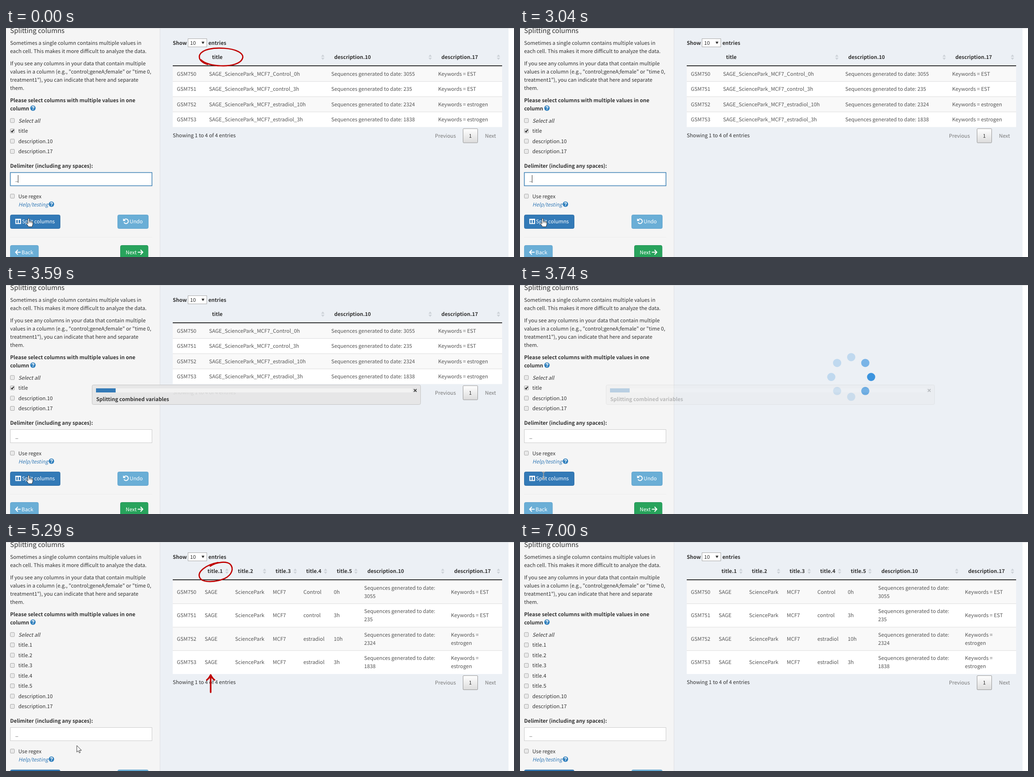
Recreate the animation shown at these times as an HTML page. Size 1112 by 503 pixels, loop 7070 ms.

```html
<!DOCTYPE html>
<html lang="en">
<head>
<meta charset="utf-8">
<title>Splitting columns</title>
<style>
html, body { margin: 0; width: 100%; height: 100%; overflow: hidden; background: #fff; }
svg { display: block; width: 1112px; height: 503px; }
text {
  font: 11.3px "Noto Sans CJK JP", "Noto Sans CJK SC", "Noto Sans CJK", sans-serif;
  fill: #333; white-space: pre; text-rendering: geometricPrecision;
}
.b { font-weight: 700; }
.i { font-style: italic; }
.cell { fill: #555; }
.page { fill: #777; }
.white { fill: #fff; }
.link { fill: #337ab7; font-style: italic; }
.h { font-size: 14.6px; }
.ink { fill: none; stroke: #c00000; stroke-width: 2.7; stroke-linecap: round; stroke-linejoin: round; }
.icon { fill: none; stroke: #fff; stroke-width: 2; }
</style>
</head>
<body>
<svg id="stage" viewBox="0 0 1112 503" xmlns="http://www.w3.org/2000/svg"></svg>
<script>
const LOOP = 7070;
const stage = document.getElementById('stage');

// Drawing helpers
const text = (x, y, s, cls = '') => `<text x="${x}" y="${y}" class="${cls}">${s}</text>`;
const rect = (x, y, w, h, fill, more = '') =>
  `<rect x="${x}" y="${y}" width="${w}" height="${h}" fill="${fill}" ${more}/>`;
const path = (d, more) => `<path d="${d}" ${more}/>`;
const group = (id, body, more = '') => `<g id="${id}" ${more}>${body}</g>`;

const button = (x, y, w, fill, edge) =>
  rect(x + .5, y + .5, w - 1, 30, fill, `rx="3" stroke="${edge}"`);

const help = (x, y) =>
  `<circle cx="${x}" cy="${y}" r="5.9" fill="#2f7fbd"/>` +
  path(`M${x - 2} ${y - 1.6}q.2-2 2.1-2 2 0 2 1.7 0 1.2-1.1 1.6-.9.4-.9 1.4`,
    'fill="none" stroke="#fff" stroke-width="1.6"') +
  rect(x - .8, y + 2.2, 1.7, 1.7, '#fff');

const checkbox = (y, label, on, cls = '') =>
  rect(9.5, y - 4.5, 9, 9, '#e9e9e9', 'rx="1.5" stroke="#a9a9a9"') +
  (on ? path(`M11.3 ${y}l2 2.4 3.7-5`, 'fill="none" stroke="#222" stroke-width="1.9"') : '') +
  text(27, y + 4.3, label, cls);

const sorter = x =>
  path(`M${x - 3.7} 63h7.4l-3.7-4.7zM${x - 3.7} 65.3h7.4l-3.7 4.7z`, 'fill="#cdd2d8"');

// Left panel
const intro = [
  [36.7, 'Sometimes a single column contains multiple values in'],
  [54.6, 'each cell. This makes it more difficult to analyze the data.'],
  [81.7, 'If you see any columns in your data that contain multiple'],
  [99.7, 'values in a column (e.g., "control;geneA;female" or "time 0,'],
  [117.7, 'treatment1"), you can indicate that here and separate'],
  [135.7, 'them.']
];

const panel = () =>
  rect(0, 0, 337, 503, '#f5f5f5') + rect(337, 0, 763, 503, '#ecf0f5') +
  rect(336.6, 0, 1, 503, '#dcdfe3') + rect(0, 0, 1112, 1, '#d3d5d8') +
  text(9, 11.3, 'Splitting columns', 'h') +
  intro.map(([y, s]) => text(9, y, s)).join('') +
  text(9, 162.6, 'Please select columns with multiple values in one', 'b') +
  text(9, 180.6, 'column', 'b') + help(59, 176) +
  checkbox(203.3, 'Select all', false, 'i');

const choices = (names, ticked) =>
  names.map((n, i) => checkbox(226 + i * 22.5, n, n === ticked)).join('');

const splitIcon =
  path('M21.5 420.2h10.5v9.3h-10.5zM26.7 420v9.5', 'class="icon" stroke-width="1.7"') +
  rect(20.6, 419, 12.3, 2.6, '#fff');
const undoIcon =
  path('M258.6 421.7a5 5 0 1 1-.3 5.2', 'class="icon"') +
  path('M256.3 418.2v5.8h5.8z', 'fill="#fff"');
const arrowIcon = (x, dir) =>
  path(`M${x} 492.5h${-11 * dir}M${x - 5 * dir} 487.3l${5 * dir} 5.2l${-5 * dir} 5.2`, 'class="icon"');

// Everything below the list of choices; it moves down as the list grows
const form = dy => `<g transform="translate(0 ${dy})">` +
  text(9, 306.7, 'Delimiter (including any spaces):', 'b') +
  rect(9.5, 317.5, 310, 29, '#fff', `stroke="#ccc" ${dy ? '' : 'id="field"'}`) +
  text(20.5, 335.7, '_', 'cell') +
  checkbox(369.3, 'Use regex') + text(27, 391.6, 'Help/testing', 'link') + help(99.5, 387) +
  button(9, 410, 110, '#337ab7', '#2e6da4') + splitIcon + text(35, 429.4, 'Split columns', 'white') +
  button(244, 410, 68, '#6aaed6', '#62a5ce') + undoIcon + text(270.5, 429.4, 'Undo', 'white') +
  rect(9, 459, 311, 1, '#ececec') +
  button(9, 477, 62.5, '#6aaed6', '#62a5ce') + arrowIcon(21, -1) + text(34, 497, 'Back', 'white') +
  button(250, 477, 61.5, '#28a35c', '#23955a') + arrowIcon(299.5, 1) + text(262, 497, 'Next', 'white') +
  '</g>';

// Table
function table(heads, sorters, columns, rows, rowH) {
  const bottom = 84 + rowH * rows.length;
  let out = text(365, 37.2, 'Show', 'b') +
    rect(398.5, 23.5, 41, 18, '#fff', 'stroke="#aaa"') + text(403, 37.2, '10') +
    path('M428 30h6.4l-3.2 5.6z', 'fill="#333"') + text(443, 37.2, 'entries', 'b');
  heads.forEach(([x, s]) => out += text(x, 68.4, s, 'b'));
  out += sorters.map(sorter).join('');
  rows.forEach((row, r) => {
    const y = 84 + r * rowH, mid = y + rowH / 2 + 4.2;
    out += rect(365, y, 721, rowH, r % 2 ? '#fff' : '#f9f9f9');
    if (r) out += rect(365, y - .5, 721, 1, '#ddd');
    row.forEach((cell, c) => {
      const lines = cell.split('|');
      lines.forEach((s, i) =>
        out += text(columns[c], mid + (i - (lines.length - 1) / 2) * 18, s, 'cell'));
    });
  });
  out += rect(365, 82.2, 721, 1.7, '#111');
  return out + text(365, bottom + 22, 'Showing 1 to 4 of 4 entries') +
    text(939, bottom + 23.3, 'Previous', 'page') +
    rect(1000.5, bottom + 3.5, 32, 31, 'url(#grey)', 'rx="1.5" stroke="#979797"') +
    text(1013.3, bottom + 23.3, '1') + text(1048.5, bottom + 23.3, 'Next', 'page');
}

const samples = [
  ['GSM750', 'Control', '0h', '3055', 'EST'],
  ['GSM751', 'control', '3h', '235', 'EST'],
  ['GSM752', 'estradiol', '10h', '2324', 'estrogen'],
  ['GSM753', 'estradiol', '3h', '1838', 'estrogen']
];
const joined = samples.map(([id, kind, time, n, key]) =>
  [id, `SAGE_SciencePark_MCF7_${kind}_${time}`, `Sequences generated to date: ${n}`, `Keywords = ${key}`]);
const parted = samples.map(([id, kind, time, n, key]) =>
  [id, 'SAGE', 'SciencePark', 'MCF7', kind, time, `Sequences generated to date:|${n}`,
    `Keywords =${key === 'EST' ? ' ' : '|'}${key}`]);

const tableBefore = table(
  [[451, 'title'], [718.5, 'description.10'], [953, 'description.17']],
  [693.5, 928.5, 1078], [374, 444.5, 712, 946], joined, 33.4);
const tableAfter = table(
  [[441, 'title.1'], [507.5, 'title.2'], [590, 'title.3'], [657, 'title.4'], [724, 'title.5'],
    [791, 'description.10'], [981, 'description.17']],
  [483.5, 566, 633, 699.5, 766, 956, 1078],
  [374, 435, 501.5, 584, 651, 717.5, 784, 974], parted, 51.5);

// Progress note and spinner
const note =
  rect(188.5, 219.5, 719, 43, '#e6e6e6', 'rx="3" stroke="#c4c4c4" fill-opacity=".9"') +
  rect(197, 227, 692, 9, '#f2f2f2') + rect(197, 227, 1.5, 9, '#337ab7', 'id="bar"') +
  path('M892.7 228.7l6 6m0-6l-6 6', 'stroke="#444" stroke-width="1.9"') +
  text(197.5, 254.8, 'Splitting combined variables', 'b');

const dots = Array.from({ length: 8 }, (_, i) => {
  const a = i * Math.PI / 4;
  return `<circle cx="${725 + 43.6 * Math.cos(a)}" cy="${202 + 43.6 * Math.sin(a)}" r="9" fill="#3c94de"/>`;
}).join('');

// Pen marks
const ink = (d, more = '') => path(d, 'class="ink" ' + more);
const titleRing = ink('M441 80C426 75 421 67 424 59C430 46 455 43 477 44.500C503 46 521 55 518 66C514 79 492 84 470 83C452 83 433 77 427 70');
const buttonRing = ink('M47 391C20 391 -2 413 2 437C8 460 55 464 100 457C140 451 161 441 158 427C154 411 122 399 82 397.500C54 396 30 398 8 405');
const columnMark =
  ink('M464 45C437 50 418 66 424 78C430 91 461 88 479 80C495 72 499 58 491 49C483 42 463 43 447 53') +
  ink('M448 330V293M439.500 303Q445 299 448 292Q451 299 456.500 303', 'style="stroke-width:3.4"');

// Pointers, each with its hot spot at 0,0
const hand = path('M-1.500 1.200Q0-.8 1.500 1.200V7Q3 5.600 4.300 7.200Q6 6 7 8Q9 7.200 9.300 9.200V13L7.500 18.500H0L-5 11.500Q-4.300 9.500-1.500 12Z',
  'fill="#fff" stroke="#222" stroke-width=".9"') + path('M1.500 7v3.500M4.300 7.500v3M7 8.300v2.500', 'stroke="#222" stroke-width=".8"');
const beam = path('M-3.500-7.500Q-.5-7.500 0-6Q.5-7.500 3.500-7.500M0-6V6M-3.500 7.500Q-.5 7.500 0 6Q.5 7.500 3.500 7.500',
  'fill="none" stroke="currentColor" stroke-width="1.5"');
const arrow = path('M0 0V14.500L3.300 11.500L5.500 16.300L7.700 15.300L5.600 10.600H10.200Z', 'fill="#fff" stroke="#222" stroke-width=".9"');

stage.innerHTML =
  '<defs><linearGradient id="grey" x2="0" y2="1"><stop stop-color="#fff"/><stop offset="1" stop-color="#dcdcdc"/></linearGradient></defs>' +
  panel() +
  group('formBefore', choices(['title', 'description.10', 'description.17'], 'title') + form(0)) +
  group('formAfter', choices(['title.1', 'title.2', 'title.3', 'title.4', 'title.5', 'description.10', 'description.17']) + form(90)) +
  group('caret', rect(26, 323, 1, 17, '#333')) +
  group('tableBefore', tableBefore) + group('tableAfter', tableAfter) +
  group('spinner', dots) + group('note', note) +
  group('titleRing', titleRing) + group('buttonRing', buttonRing) + group('columnMark', columnMark) +
  group('hand', hand, 'transform="translate(49.5 418)"') + group('beam', beam) + group('arrow', arrow);

const el = id => document.getElementById(id);
const show = (id, on) => el(id).style.display = on ? '' : 'none';
const place = (id, x, y) => el(id).setAttribute('transform', `translate(${x} ${y})`);

// Last entry whose start time has passed
const at = (steps, t) => steps.reduce((hit, s) => t >= s[0] ? s : hit);

// time, opacity, bar width
const noteSteps = [[0, 0, 0], [3420, .5, 1.5], [3510, 1, 1.5], [3590, 1, 43], [3670, .65, 43], [3740, .3, 43], [3810, 0, 0]];
// time, x, y, pointer
const pointerSteps = [
  [0, 49.5, 418, 'hand'], [3740, 51.5, 418, 'beam'], [3810, 51.5, 419, 'beam'],
  [4750, 53, 420, 'beam'], [4830, 58, 423, 'beam'], [4900, 67, 427, 'beam'],
  [4980, 80, 432, 'beam'], [5060, 95, 437, 'arrow'], [5130, 113, 441, 'arrow'],
  [5210, 133, 444, 'arrow'], [5290, 155, 447, 'arrow'], [5360, 193, 453, 'arrow'],
  [5440, 233, 459, 'arrow'], [5520, 280, 468, 'arrow'], [5600, 330, 478, 'arrow'],
  [5670, 387, 490, 'arrow'], [5750, 0, 0, '']
];

function draw(t) {
  const split = t >= 3810, busy = t >= 3670 && !split, focus = t < 3340;
  show('formBefore', !split);
  show('formAfter', split);
  show('tableBefore', t < 3670);
  show('tableAfter', split);
  show('caret', focus);
  el('field').setAttribute('stroke', focus ? '#3c80b4' : '#ccc');
  el('field').setAttribute('stroke-width', focus ? 1.5 : 1);

  show('spinner', busy);
  const head = t >= 3740 ? 1 : 0;
  [...el('spinner').children].forEach((dot, i) => {
    const lag = (head - i + 8) % 8;
    dot.setAttribute('fill-opacity', lag < 2 ? 1 : lag === 2 ? .65 : .25);
  });

  const [, opacity, width] = at(noteSteps, t);
  show('note', opacity > 0);
  el('note').setAttribute('opacity', opacity);
  el('bar').setAttribute('width', width);

  show('titleRing', t < 1720);
  show('buttonRing', t >= 1720 && t < 3040);
  show('columnMark', split && t < 7000);
  place('columnMark', t >= 5360 ? 282 : 0, 0);

  const [, x, y, kind] = at(pointerSteps, t);
  ['hand', 'beam', 'arrow'].forEach(id => show(id, id === kind));
  if (kind) place(kind, x, y);
  el('beam').style.color = split ? '#111' : '#b4a99c';
}

const start = performance.now();
function tick() {
  draw((performance.now() - start) % LOOP);
  requestAnimationFrame(tick);
}
tick();
</script>
</body>
</html>
```
